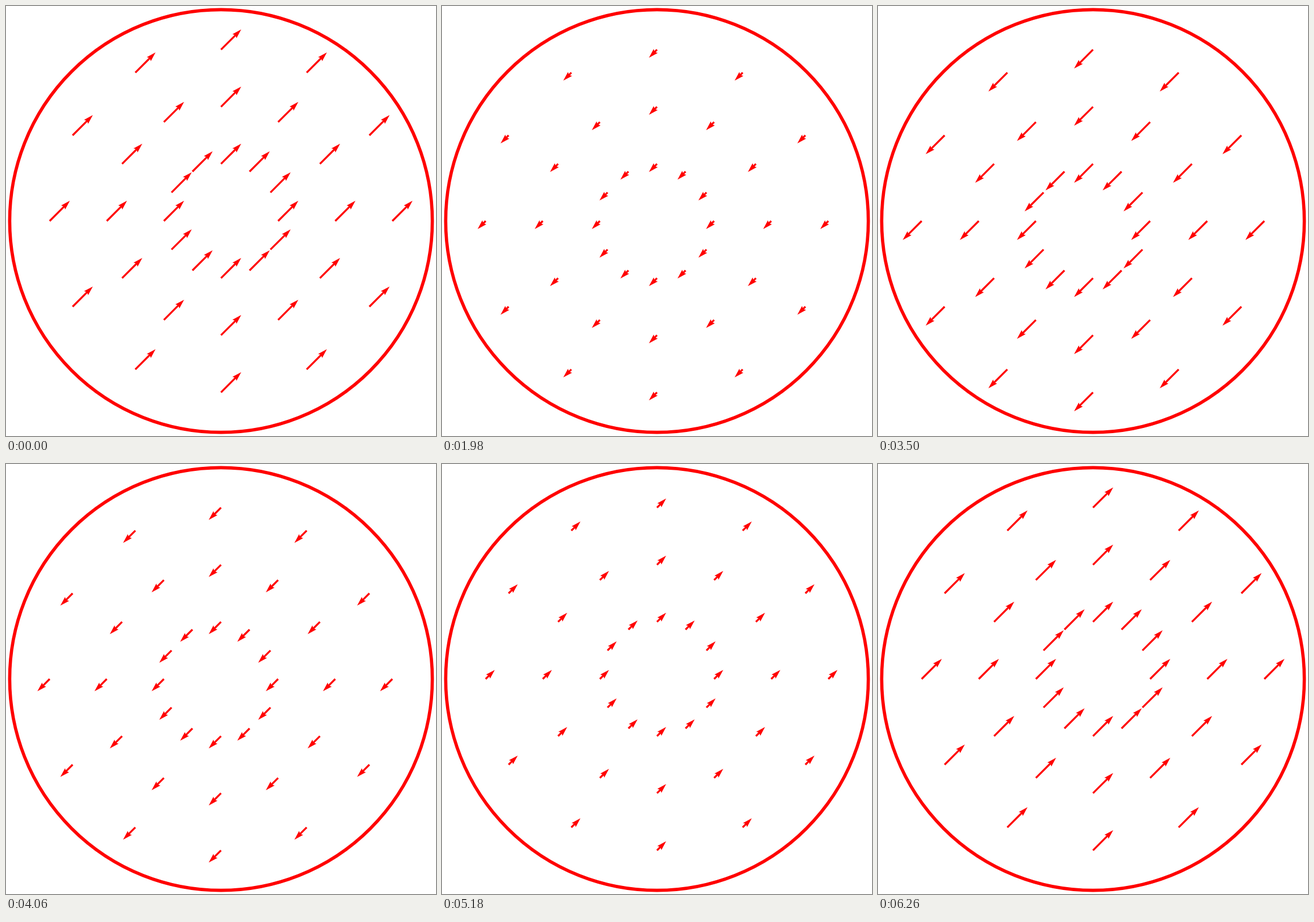
Animation, 748 px wide and 748 px high, one loop 6.28 s. Source, as an HTML page with a canvas:

```html
<!DOCTYPE html>
<html>
<head>
<meta charset="utf-8">
<style>
  html, body { margin: 0; width: 100%; height: 100%; overflow: hidden; background: #fff; }
  canvas { display: block; }
</style>
</head>
<body>
<canvas id="stage" width="748" height="748"></canvas>
<script>
const ctx = document.getElementById("stage").getContext("2d");
const LOOP = 6280, STEP = 20;
const CENTER = 374, UNIT = 99.35, REACH = UNIT / 2;
const WIDTH = 3.3; // shaft width; the arrowhead is proportional to it

// Outline of an arrow along +x; short arrows shrink as a whole.
function arrowPoints(length) {
  const head = 5 * WIDTH;
  const k = Math.min(1, length / head), w = WIDTH * k;
  const half = [[0, w / 2], [length - 4.5 * w, w / 2], [length - 5 * w, 1.5 * w], [length, 0]];
  return [...half, ...half.slice(0, 3).reverse().map(([x, y]) => [x, -y])];
}

function dotPoints() {
  return Array.from({ length: 6 }, (_, i) =>
    [Math.cos(i * Math.PI / 3) * WIDTH / 2, Math.sin(i * Math.PI / 3) * WIDTH / 2]);
}

function draw(ms) {
  const size = REACH * Math.cos(ms / 1000);
  const length = Math.abs(size);
  const points = length < WIDTH ? dotPoints() : arrowPoints(length);

  ctx.fillStyle = "#fff";
  ctx.fillRect(0, 0, 748, 748);
  ctx.fillStyle = ctx.strokeStyle = "#f00";

  ctx.lineWidth = 5.6;
  ctx.beginPath();
  ctx.arc(CENTER, CENTER, 3.7 * UNIT, 0, 2 * Math.PI);
  ctx.stroke();

  for (let ring = 1; ring <= 3; ring++) {
    for (let i = 0; i < 12; i++) {
      const a = i * Math.PI / 6;
      ctx.save();
      ctx.translate(CENTER + ring * UNIT * Math.cos(a), CENTER + ring * UNIT * Math.sin(a));
      ctx.rotate(size < 0 ? Math.PI * 3 / 4 : -Math.PI / 4);
      ctx.beginPath();
      points.forEach(([x, y]) => ctx.lineTo(x, y));
      ctx.fill();
      ctx.restore();
    }
  }
}

const start = performance.now();
function tick() {
  const ms = (performance.now() - start) % LOOP;
  draw(Math.floor(ms / STEP) * STEP);
  requestAnimationFrame(tick);
}
tick();
</script>
</body>
</html>
```
